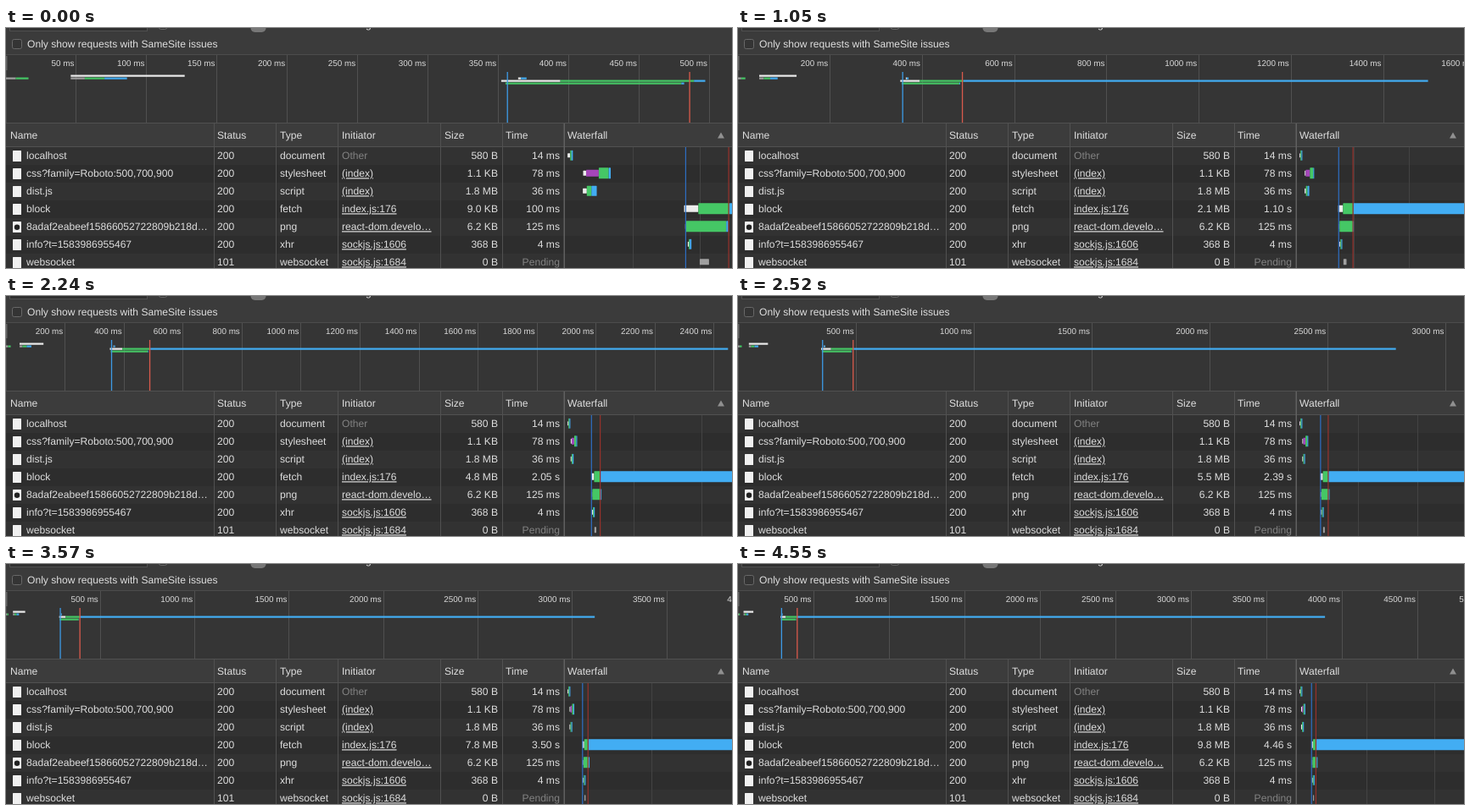
Recreate the animation shown at these times as an HTML page. Size 856 by 284 pixels, loop 4620 ms.

```html
<!DOCTYPE html>
<html lang="en">
<head>
<meta charset="utf-8">
<title>Network waterfall</title>
<style>
  html, body { margin: 0; width: 100%; height: 100%; overflow: hidden; background: #3a3a3a; }
  svg { display: block; width: 856px; height: 284px; }
  text { font: 12.1px "Liberation Sans", Arial, sans-serif; fill: #dedede; text-rendering: geometricPrecision; }
  .tick { font-size: 9.9px; fill: #dadada; }
  .dim { fill: #828282; }
  .link { text-decoration: underline; }
  .end { text-anchor: end; }
</style>
</head>
<body>
<svg viewBox="0 0 856 284">
  <g id="base"></g>
  <g id="live"></g>
</svg>
<script>
const LOOP = 4620, STEP = 70, WIDTH = 856;
const GREEN = '#45c765', BLUE = '#42adf3', PURPLE = '#a546ba', WHITE = '#ececec', GRAY = '#a0a0a0';
const FALL_X = 661.4, FALL_W = WIDTH - FALL_X;
const DOM_READY = 356, PAGE_LOAD = 485.5;

// loop time (ms), request duration (ms), received KB
const PROGRESS = [
  [0, 100, 9], [630, 688, 1002], [1540, 1580, 3584], [2240, 2050, 4915],
  [2940, 2900, 6758], [3570, 3500, 7987], [4550, 4460, 10035]
];

const REQUESTS = [
  ['localhost', 200, 'document', 'Other', '580 B', '14 ms'],
  ['css?family=Roboto:500,700,900', 200, 'stylesheet', '(index)', '1.1 KB', '78 ms'],
  ['dist.js', 200, 'script', '(index)', '1.8 MB', '36 ms'],
  ['block', 200, 'fetch', 'index.js:176', '', ''],
  ['8adaf2eabeef15866052722809b218d…', 200, 'png', 'react-dom.develo…', '6.2 KB', '125 ms'],
  ['info?t=1583986955467', 200, 'xhr', 'sockjs.js:1606', '368 B', '4 ms'],
  ['websocket', 101, 'websocket', 'sockjs.js:1684', '0 B', 'Pending']
];

const rowY = i => 151 + 21 * i;

function rect(x, y, w, h, fill, extra = '') {
  return `<rect x="${x}" y="${y}" width="${w}" height="${h}" fill="${fill}" ${extra}/>`;
}
function vline(x, y1, y2, color, w = 1) {
  return rect(x, y1, w, y2 - y1, color);
}
function label(x, y, str, cls = '') {
  return `<text x="${x}" y="${y}" class="${cls}">${str}</text>`;
}

function drawBase() {
  let s = rect(0, 0, WIDTH, 284, '#3b3b3b');

  // lower edge of the cropped toolbar
  s += rect(4.5, -10.5, 162, 14, '#303030', 'stroke="#505050"');
  s += rect(180.5, -8.5, 9, 10, '#333', 'rx="2" stroke="#666"');
  s += rect(288.5, -9, 18, 14, '#777', 'rx="5"');
  s += label(424, -0.5, 'g');

  s += rect(7.5, 13.5, 11, 11, '#343434', 'rx="2" stroke="#686868"');
  s += label(25, 23.3, 'Only show requests with SameSite issues');

  s += rect(0, 31, WIDTH, 1, '#4c4c4c') + rect(0, 32, WIDTH, 80, '#353535');
  s += rect(0, 112, WIDTH, 1, '#515151') + rect(0, 113, WIDTH, 27, '#3c3c3c');
  s += rect(0, 140, WIDTH, 1, '#515151');

  REQUESTS.forEach((r, i) => {
    const y = rowY(i), base = y + 4.3;
    s += rect(0, y - 10, WIDTH, 21, i % 2 ? '#2d2d2d' : '#323232');
    s += rect(8, y - 6, 10, 13, '#f0f0f0', 'rx="0.5"');
    if (r[2] === 'png') s += `<circle cx="13" cy="${y + 0.8}" r="3.2" fill="#222"/>`;
    s += label(24, base, r[0]) + label(249, base, r[1]) + label(323, base, r[2]);
    s += label(396, base, r[3], i ? 'link' : 'dim');
    s += label(580, base, r[4], 'end');
    s += label(653, base, r[5], r[5] === 'Pending' ? 'end dim' : 'end');
  });

  const heads = { Name: 5, Status: 249, Type: 323, Initiator: 396, Size: 517, Time: 589, Waterfall: 662 };
  for (const [name, x] of Object.entries(heads)) s += label(x, 131.3, name);
  for (const x of [245, 318, 391, 512, 585]) s += vline(x, 113, 284, '#515151');
  s += vline(657.5, 113, 284, '#606060', 1.5);
  s += '<path d="M839 130.5h8l-4-7z" fill="#909090"/>';
  document.getElementById('base').innerHTML = s;
}

function progressAt(t) {
  let i = 0;
  while (i < PROGRESS.length - 2 && t >= PROGRESS[i + 1][0]) i++;
  const a = PROGRESS[i], b = PROGRESS[i + 1];
  const k = (t - a[0]) / (b[0] - a[0]);
  const mix = n => a[n] + (b[n] - a[n]) * k;
  return { time: mix(1), kb: mix(2), end: mix(1) + 397 };
}

// the overview widens by a quarter whenever the data outgrows it
function overviewSpan(end) {
  let span = 516;
  while (span < end) span *= 1.25;
  return span;
}

// smallest 1-2-5 step that is at least 64 px wide
function gridStep(scale) {
  const min = 64 / scale, p = 10 ** Math.floor(Math.log10(min));
  return [1, 2, 5, 10].map(n => n * p).find(v => v >= min);
}

function formatTime(ms) {
  return ms < 1000 ? `${Math.round(ms)} ms` : `${(ms / 1000).toFixed(2)} s`;
}
function formatSize(kb) {
  if (kb >= 1024) return `${(kb / 1024).toFixed(1)} MB`;
  return `${kb.toFixed(kb < 100 ? 1 : 0)} KB`;
}

function overview(now, before) {
  const tickScale = WIDTH / overviewSpan(before.end);
  const scale = WIDTH / overviewSpan(now.end);
  const step = gridStep(tickScale);
  let s = '';
  for (let ms = step; ms * tickScale < WIDTH + 60; ms += step) {
    const x = ms * tickScale;
    s += vline(Math.floor(x), 32, 112, '#505050') + label(x - 2.5, 45.3, `${ms} ms`, 'tick end');
  }
  s += rect(0, 33, 1.5, 17, '#666') + rect(0, 50, 1, 62, '#484848');

  const bar = (y, a, b, color) => rect(a * scale, y - 1, (b - a) * scale, 2.2, color);
  s += bar(59.5, 0, 7, GRAY) + bar(59.5, 7, 16, GREEN);
  s += bar(56.5, 46, 127, WHITE);
  s += bar(59.5, 46, 56, GRAY) + bar(59.5, 56, 70, GREEN) + bar(59.5, 70, 86, BLUE);
  s += bar(62.5, 352, 394, WHITE) + bar(62.5, 394, 489, GREEN) + bar(62.5, 489, now.end, BLUE);
  s += bar(65.5, 355, 480, GREEN) + bar(65.5, 480, 482, BLUE);
  s += bar(59.5, 364, 366, WHITE) + bar(59.5, 366, 370, BLUE);
  s += vline(DOM_READY * scale, 52, 112, '#3d9be6', 1.3);
  s += vline(PAGE_LOAD * scale, 52, 112, '#d95a4c', 1.3);
  return s;
}

function waterfall(end) {
  const scale = FALL_W / end, step = gridStep(scale);
  const at = ms => FALL_X + ms * scale;
  let s = '';
  for (let ms = step; at(ms) < WIDTH; ms += step) s += vline(Math.floor(at(ms)), 141, 284, '#434343');

  // each part: end time, height, colour; parts stack with a minimum width
  const bar = (row, start, ...parts) => {
    let x = at(start) + 0.7, from = start;
    for (const [to, h, color] of parts) {
      const w = Math.max(1.1, (to - from) * scale);
      s += rect(x, rowY(row) - 0.2 - h / 2, w, h, color, 'rx="0.6"');
      x += w;
      from = to;
    }
  };
  bar(0, 0, [8, 5, WHITE], [12, 12, GREEN], [16, 12, BLUE]);
  bar(1, 47, [56, 6, WHITE], [94, 8, PURPLE], [124, 13, GREEN], [130, 13, BLUE]);
  bar(2, 46, [58, 6, WHITE], [72, 12, GREEN], [88, 12, BLUE]);
  bar(3, 351, [394, 8, WHITE], [487, 13, GREEN], [end, 13, BLUE]);
  bar(4, 354, [357, 6, GRAY], [478, 13, GREEN], [484, 13, BLUE]);
  bar(5, 362, [365, 6, WHITE], [368, 12, GREEN], [373, 12, BLUE]);
  bar(6, 398, [426, 7, GRAY]);
  s += vline(at(DOM_READY), 141, 284, '#2f6fc4', 1.2);
  s += vline(at(PAGE_LOAD), 141, 284, '#97322c', 1.2);
  return s;
}

const live = document.getElementById('live');
let shown = -1;

function draw(t) {
  const now = progressAt(t), before = progressAt(Math.max(0, t - STEP));
  const base = rowY(3) + 4.3;
  live.innerHTML = overview(now, before) + waterfall(now.end) +
    label(580, base, formatSize(now.kb), 'end') +
    label(653, base, formatTime(now.time), 'end');
}

const startTime = performance.now();
function tick() {
  const t = Math.floor(((performance.now() - startTime) % LOOP) / STEP) * STEP;
  if (t !== shown) draw(shown = t);
  requestAnimationFrame(tick);
}

drawBase();
tick();
</script>
</body>
</html>
```
